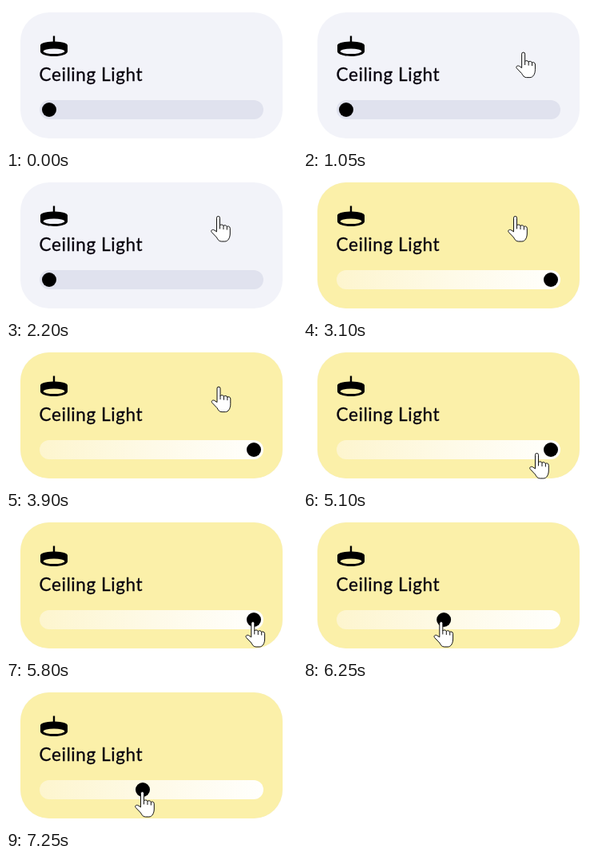
Recreate the animation shown at these times as an HTML page. Size 364 by 178 pixels, loop 8000 ms.

```html
<!DOCTYPE html>
<html lang="en">
<head>
<meta charset="utf-8">
<title>Ceiling Light</title>
<style>
  html, body { margin: 0; width: 100%; height: 100%; overflow: hidden; background: #fff; }
  svg { display: block; width: 100%; height: 100%; }
  text { font: 400 22.5px Lato, "Open Sans", sans-serif; letter-spacing: .6px; }
</style>
</head>
<body>
<svg viewBox="0 0 364 178">
  <defs>
    <linearGradient id="glow">
      <stop offset="0" stop-color="#fdf5ce"/>
      <stop offset=".5" stop-color="#fefae7"/>
      <stop offset="1" stop-color="#fffffd"/>
    </linearGradient>
  </defs>
  <rect x="18" y="8" width="328" height="158" rx="36" fill="#f2f3f9"/>
  <rect x="42" y="118" width="280" height="24" rx="12" fill="#e0e2ee"/>
  <g id="on">
    <rect x="18" y="8" width="328" height="158" rx="36" fill="#fbf0a9"/>
    <rect x="42" y="118" width="280" height="24" rx="12" fill="url(#glow)"/>
  </g>
  <path fill-rule="evenodd" d="M58.8 37.5h2.4v7c9 .2 15.8 2.2 15.8 5v7.5c0 3.4-7.6 6-17 6s-17-2.6-17-6v-7.5c0-2.8 6.8-4.8 15.8-5z
    M46.7 56.8a13.3 3.3 0 0 0 26.6 0a13.3 3.3 0 0 0-26.6 0z"/>
  <text x="41.5" y="94" fill="#08040f" stroke="#08040f" stroke-width=".3">Ceiling Light</text>
  <circle id="thumb" cy="130" r="9"/>
  <g id="hand" fill="#fff" stroke="#111" stroke-linejoin="round" stroke-linecap="round">
    <path d="M-2 19.5V2.5a2 2 0 0 1 4 0V12c.3-1.500 4.300-1.400 4.500.6.5-1.400 4.200-1 4.400 1 .6-1.200 3.900-.6 3.900 1.800V22c0 5.500-2.500 10-6.500 10H4c-3.500 0-4.500-2.500-6-5l-6.200-6.500c-1.600-2 .6-4 2.600-3z"/>
    <path fill="none" d="M2 12v4M6.500 12.600v4M10.900 13.600v3.500"/>
  </g>
</svg>
<script>
  const LOOP = 8000;
  const el = id => document.getElementById(id);
  const on = el('on'), thumb = el('thumb'), hand = el('hand');

  const ramp = (t, a, b) => Math.min(1, Math.max(0, (t - a) / (b - a)));
  const smooth = u => u * u * (3 - 2 * u);
  const easeOut = u => 1 - (1 - u) ** 3;
  const mix = (a, b, u) => a + (b - a) * u;

  // Pointer legs: start, end, target x, target y, easing
  const legs = [
    [870, 1250, 265.5, 50, easeOut],
    [3850, 4350, 283.5, 73, smooth],
    [4350, 4600, 285.5, 130, smooth],
    [5000, 5300, 312, 145, smooth],
    [5300, 5600, 309.5, 132, smooth]
  ];

  const drag = t => smooth(ramp(t, 5780, 6290));

  function pointer(t) {
    let x = 336, y = 103;
    for (const [a, b, tx, ty, ease] of legs) {
      const u = ease(ramp(t, a, b));
      x = mix(x, tx, u);
      y = mix(y, ty, u);
    }
    return [mix(x, 170.5, drag(t)), y];
  }

  function draw(t) {
    const lit = ramp(t, 2950, 3060);
    on.setAttribute('opacity', lit);
    const x = mix(54, 310, easeOut(lit));
    // The thumb trails the pointer slightly
    thumb.setAttribute('cx', mix(x, 171, drag(t - 20)));
    hand.setAttribute('visibility', t < 900 ? 'hidden' : 'visible');
    hand.setAttribute('transform', `translate(${pointer(t).join(' ')})`);
  }

  const start = performance.now();
  function tick() {
    draw((performance.now() - start) % LOOP);
    requestAnimationFrame(tick);
  }
  draw(0);
  requestAnimationFrame(tick);
</script>
</body>
</html>
```
